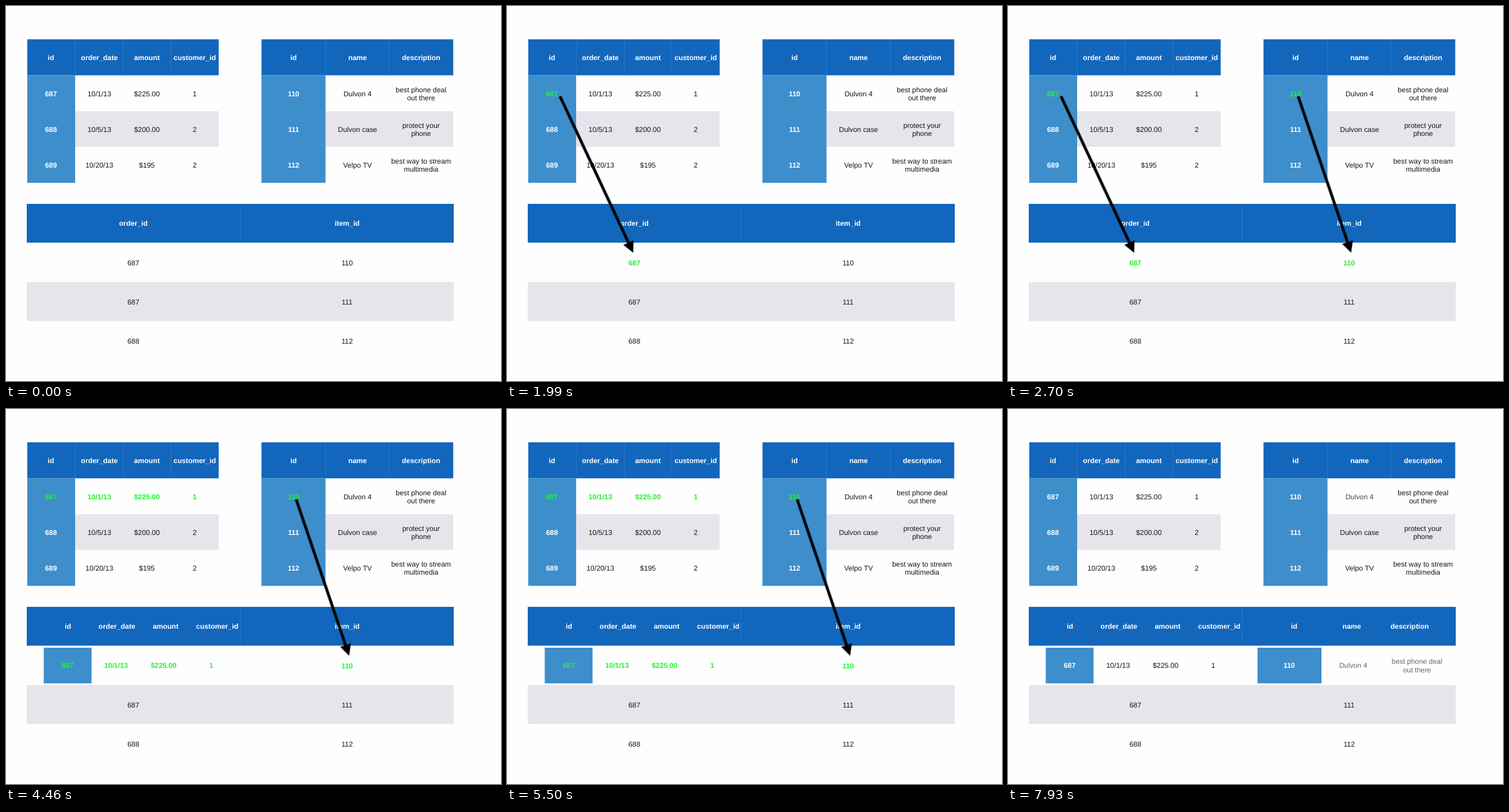
Write an HTML page that moves like this. It is 859 px wide and 652 px high and loops after 8 s.

```html
<!DOCTYPE html>
<html lang="en">
<head>
<meta charset="utf-8">
<title>Joining orders and items</title>
<style>
  :root { --ink: #161616; --green: #1ff62c; --end: #161616; }
  html, body { margin: 0; width: 100%; height: 100%; overflow: hidden; background: #fefefe; }
  svg { display: block; width: 859px; height: 652px; }
  text {
    font: 12.35px "Liberation Sans", Arial, sans-serif;
    text-anchor: middle;
    text-rendering: geometricPrecision;
    fill: var(--ink);
  }
  .b { font-weight: 700; fill: #fff; }
  .head { fill: #1266bc; }
  .key { fill: #3e8ecc; }
  .band { fill: #e6e5ec; }
  .rule { stroke: #2c78c6; stroke-width: 1; }
  .edge { fill: none; stroke: #4d93d2; stroke-width: .5; }
  .shaft { stroke: #000; stroke-width: 5; }

  [class*="a-"] { animation: 8s step-end infinite; }
  .a-orderKey { animation-name: orderKey; }
  .a-itemKey { animation-name: itemKey; }
  .a-orderCell { animation-name: orderCell; }
  .a-itemCell { animation-name: itemCell; }
  .a-orderRef { animation-name: orderRef; }
  .a-itemRef { animation-name: itemRef; }
  .a-orderHead { animation-name: orderHead; }
  .a-itemHead { animation-name: itemHead; }
  .a-orderArrow { animation-name: orderArrow; }
  .a-itemArrow { animation-name: itemArrow; }
  .a-orderJoin { animation-name: orderJoin; }
  .a-itemJoin { animation-name: itemJoin; }

  @keyframes orderKey {
    0% { fill: #fff; } 11.625% { fill: var(--green); } 99.125%, 100% { fill: #fff; }
  }
  @keyframes itemKey {
    0% { fill: #fff; } 33.75% { fill: var(--green); } 99.125%, 100% { fill: #fff; }
  }
  @keyframes orderCell {
    0% { fill: var(--ink); font-weight: 400; }
    55.75% { fill: var(--green); font-weight: 700; }
    77.5%, 100% { fill: var(--ink); font-weight: 400; }
  }
  @keyframes itemCell {
    0% { fill: var(--ink); font-weight: 400; }
    77.5% { fill: var(--green); font-weight: 700; }
    99.125%, 100% { fill: var(--end); font-weight: 400; }
  }
  @keyframes orderRef {
    0% { fill: var(--ink); font-weight: 400; opacity: 1; }
    11.625% { fill: var(--green); font-weight: 700; opacity: 1; }
    55.75%, 100% { opacity: 0; }
  }
  @keyframes itemRef {
    0% { fill: var(--ink); font-weight: 400; opacity: 1; }
    33.75% { fill: var(--green); font-weight: 700; opacity: 1; }
    77.5%, 100% { opacity: 0; }
  }
  @keyframes orderHead { 0% { opacity: 1; } 55.75%, 100% { opacity: 0; } }
  @keyframes itemHead { 0% { opacity: 1; } 77.5%, 100% { opacity: 0; } }
  @keyframes orderArrow { 0% { opacity: 0; } 11.625% { opacity: 1; } 55.75%, 100% { opacity: 0; } }
  @keyframes itemArrow { 0% { opacity: 0; } 33.75% { opacity: 1; } 77.5%, 100% { opacity: 0; } }
  @keyframes orderJoin { 0% { opacity: 0; } 55.75%, 100% { opacity: 1; } }
  @keyframes itemJoin { 0% { opacity: 0; } 77.5%, 100% { opacity: 1; } }
</style>
</head>
<body>
<svg id="stage" viewBox="0 0 859 652"></svg>
<script>
const stage = document.getElementById('stage');

function add(parent, tag, attrs, label) {
  const node = document.createElementNS('http://www.w3.org/2000/svg', tag);
  for (const key in attrs) node.setAttribute(key, attrs[key]);
  if (label) node.textContent = label;
  return parent.appendChild(node);
}

const box = (parent, cls, x, y, right, bottom) =>
  add(parent, 'rect', { class: cls, x, y, width: right - x, height: bottom - y });

// A label centred on (x, y); "|" splits it into two lines.
function label(parent, str, x, y, cls = '', style = '') {
  const lines = str.split('|');
  lines.forEach((line, i) => {
    const base = y + 4.3 + (i - (lines.length - 1) / 2) * 14.2;
    add(parent, 'text', { x, y: base, class: cls, style }, line);
  });
}

const group = cls => add(stage, 'g', { class: cls });

// Upper table: blue header, blue key column, banded rows.
function table(x, right, seams, centres, heads, rows, name) {
  box(stage, 'head', x, 58, right, 120.5);
  box(stage, 'band', seams[0], 183, right, 245);
  box(stage, 'key', x, 120.5, seams[0], 307.5);
  for (const s of seams) add(stage, 'path', { class: 'rule', d: `M${s} 58V120.5` });
  add(stage, 'path', { class: 'edge', d: `M${x} 307.5V58H${right}V120.5` });
  heads.forEach((h, i) => label(stage, h, centres[i], 89.6, 'b'));
  rows.forEach((row, r) => row.forEach((cell, c) => {
    const anim = r ? '' : c ? `a-${name}Cell` : `a-${name}Key`;
    const fade = name === 'item' && c === 1 ? '--end:#484848' : '';
    label(stage, cell, centres[c], 152.4 + 62.1 * r, (c ? '' : 'b ') + anim, fade);
  }));
}

// Joined record, laid over the first row of the lower table.
function join(name, x, right, headX, cellX, heads, row, end) {
  const g = group(`a-${name}Join`);
  heads.forEach((h, i) => label(g, h, headX[i], 378.1, 'b'));
  box(g, 'key', x, 415, right, 477);
  row.forEach((cell, i) =>
    label(g, cell, cellX[i], 446.1, i ? `a-${name}Cell` : `b a-${name}Key`, `--end:${end}`));
}

function arrow(name, x, y, tipX, tipY) {
  const g = group(`a-${name}Arrow`);
  const angle = Math.atan2(tipY - y, tipX - x) * 180 / Math.PI;
  const len = Math.hypot(tipX - x, tipY - y);
  g.setAttribute('transform', `translate(${x} ${y}) rotate(${angle})`);
  add(g, 'path', { class: 'shaft', d: `M0 0H${len - 18}` });
  add(g, 'path', { d: `M${len} 0l-19.5 -9.8v19.6z` });
}

const orderHeads = ['id', 'order_date', 'amount', 'customer_id'];
const orders = [
  ['687', '10/1/13', '$225.00', '1'],
  ['688', '10/5/13', '$200.00', '2'],
  ['689', '10/20/13', '$195', '2']
];
const itemHeads = ['id', 'name', 'description'];
const items = [
  ['110', 'Dulvon 4', 'best phone deal|out there'],
  ['111', 'Dulvon case', 'protect your|phone'],
  ['112', 'Velpo TV', 'best way to stream|multimedia']
];

table(37, 369, [120, 203.5, 286], [78, 162, 244.5, 327.5], orderHeads, orders, 'order');
table(443.5, 776, [554.5, 665], [499, 610, 720.3], itemHeads, items, 'item');

box(stage, 'head', 36, 344, 777, 411.5);
box(stage, 'band', 36, 480, 777, 547.7);
add(stage, 'path', { class: 'rule', d: 'M406.5 344V411.5' });
label(stage, 'order_id', 221, 378.1, 'b a-orderHead');
label(stage, 'item_id', 592, 378.1, 'b a-itemHead');
[['687', '110'], ['687', '111'], ['688', '112']].forEach(([order, item], r) => {
  const y = 446.8 + 67.9 * r;
  label(stage, order, 221, y, r ? '' : 'a-orderRef');
  label(stage, item, 592, y, r ? '' : 'a-itemRef');
});

join('order', 65.5, 148.5, [107.5, 192.5, 277, 366.5], [107, 191, 273.5, 356.3],
  orderHeads, orders[0], '#161616');
join('item', 433, 544, [496.5, 596.5, 697], [488, 599, 709.8],
  itemHeads, items[0], '#686868');

arrow('order', 92, 157, 219, 429);
arrow('item', 503.5, 157, 595.5, 429);
</script>
</body>
</html>
```
